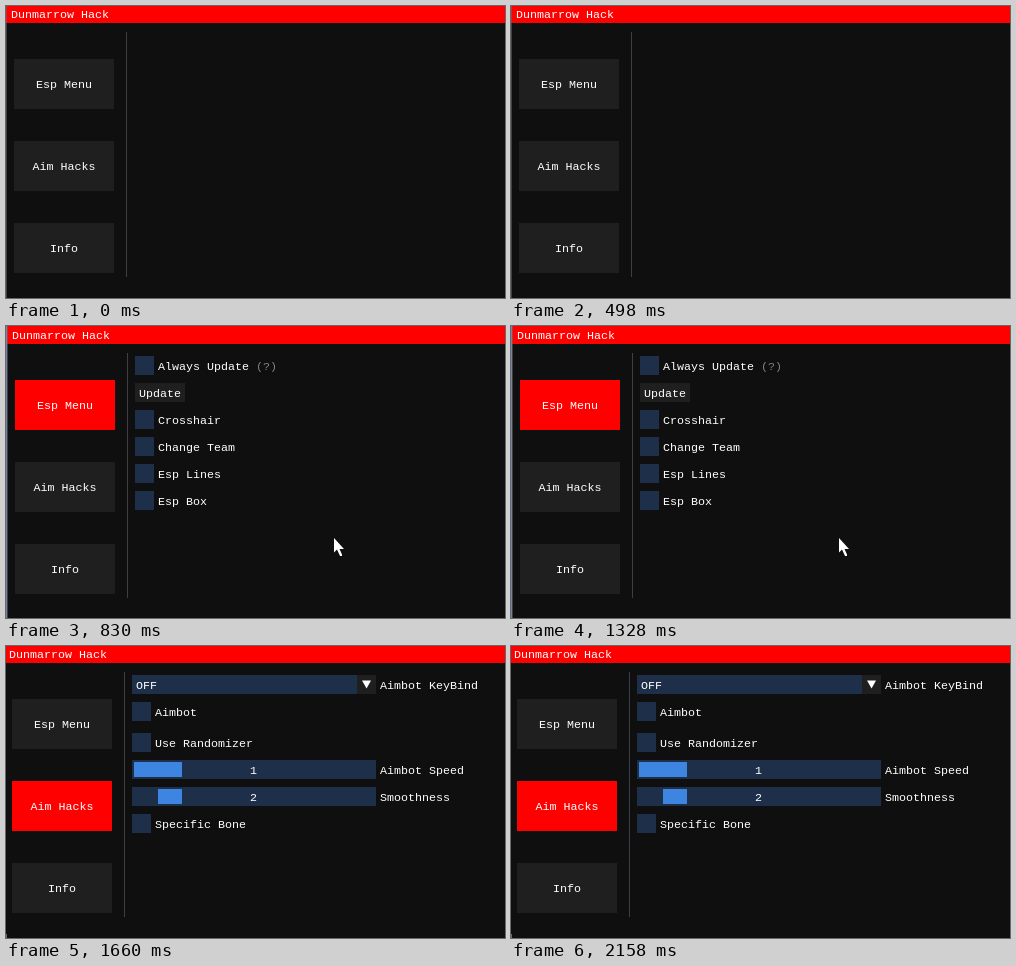
Animation of 499 by 292 pixels, one loop 2.49 s. Source, as an HTML page:

```html
<!DOCTYPE html>
<html lang="en">
<head>
<meta charset="utf-8">
<title>Menu</title>
<style>
  html, body { margin: 0; width: 100%; height: 100%; overflow: hidden; background: #0f0f0f; }
  svg { display: block; }
  rect { shape-rendering: crispEdges; }
  text { font: 11.667px "Liberation Mono", monospace; fill: #fff; white-space: pre; }
  .mid { text-anchor: middle; }
  .dim { fill: #808080; }
  .line { fill: rgba(110, 110, 128, .5); }
  .btn { fill: #1f1f1f; }
  .field { fill: #1d2f49; }
  .grab { fill: #3d85e0; }

  .window, .esp, .aim, .espBtn, .aimBtn { animation: 2490ms step-end infinite; }
  .window { animation-name: shift; }
  .esp { animation-name: second; }
  .aim { animation-name: third; }
  .espBtn { animation-name: redSecond; }
  .aimBtn { animation-name: redThird; }

  @keyframes shift {
    0% { transform: translate(0, 0); }
    33.3333% { transform: translate(1px, 1px); }
    66.6666%, 100% { transform: translate(-2px, 0); }
  }
  @keyframes second {
    0%, 66.6666%, 100% { visibility: hidden; }
    33.3333% { visibility: visible; }
  }
  @keyframes third {
    0%, 33.3333% { visibility: hidden; }
    66.6666%, 100% { visibility: visible; }
  }
  @keyframes redSecond {
    0%, 66.6666%, 100% { fill: #1f1f1f; }
    33.3333% { fill: #f00; }
  }
  @keyframes redThird {
    0%, 33.3333% { fill: #1f1f1f; }
    66.6666%, 100% { fill: #f00; }
  }
</style>
</head>
<body>
<svg width="499" height="292" viewBox="0 0 499 292">
  <defs>
    <rect id="box" class="field" x="128" width="19" height="19"/>
    <rect id="bar" class="field" x="128" width="244" height="19"/>
  </defs>
  <rect width="499" height="292" fill="#0f0f0f"/>

  <g class="window">
    <rect x="0" y="-1" width="510" height="18" fill="#f00"/>
    <rect x="-1" y="-1" width="1" height="300" fill="#7386a8"/>
    <rect class="line" x="0" y="-1" width="1" height="300"/>
    <text x="5" y="12">Dunmarrow Hack</text>
    <rect class="line" x="120" y="26" width="1" height="245"/>

    <rect class="btn espBtn" x="8" y="53" width="100" height="50"/>
    <rect class="btn aimBtn" x="8" y="135" width="100" height="50"/>
    <rect class="btn" x="8" y="217" width="100" height="50"/>
    <text class="mid" x="58" y="82">Esp Menu</text>
    <text class="mid" x="58" y="164">Aim Hacks</text>
    <text class="mid" x="58" y="246">Info</text>

    <g class="esp">
      <use href="#box" y="29"/>
      <text x="151" y="43">Always Update <tspan class="dim">(?)</tspan></text>
      <rect class="btn" x="128" y="56" width="50" height="19"/>
      <text x="132" y="70">Update</text>
      <use href="#box" y="83"/>
      <text x="151" y="97">Crosshair</text>
      <use href="#box" y="110"/>
      <text x="151" y="124">Change Team</text>
      <use href="#box" y="137"/>
      <text x="151" y="151">Esp Lines</text>
      <use href="#box" y="164"/>
      <text x="151" y="178">Esp Box</text>
    </g>

    <g class="aim">
      <use href="#bar" y="29"/>
      <rect class="btn" x="353" y="29" width="19" height="19"/>
      <path d="M358 34.6h9l-4.5 7.8z" fill="#fff"/>
      <text x="132" y="43">OFF</text>
      <text x="376" y="43">Aimbot KeyBind</text>
      <use href="#box" y="56"/>
      <text x="151" y="70">Aimbot</text>
      <use href="#box" y="87"/>
      <text x="151" y="101">Use Randomizer</text>
      <use href="#bar" y="114"/>
      <rect class="grab" x="130" y="116" width="48" height="15"/>
      <text class="mid" x="249.5" y="128">1</text>
      <text x="376" y="128">Aimbot Speed</text>
      <use href="#bar" y="141"/>
      <rect class="grab" x="154" y="143" width="24" height="15"/>
      <text class="mid" x="249.5" y="155">2</text>
      <text x="376" y="155">Smoothness</text>
      <use href="#box" y="168"/>
      <text x="151" y="182">Specific Bone</text>
    </g>
  </g>

  <path class="esp" d="M328 212v14.5l3-3 3 6.5h2v-1.5l-2.5-5.5h4.5z" fill="#fff"/>
  <rect class="aim" y="288" width="1" height="4" fill="#6a6a90"/>
</svg>
</body>
</html>
```
